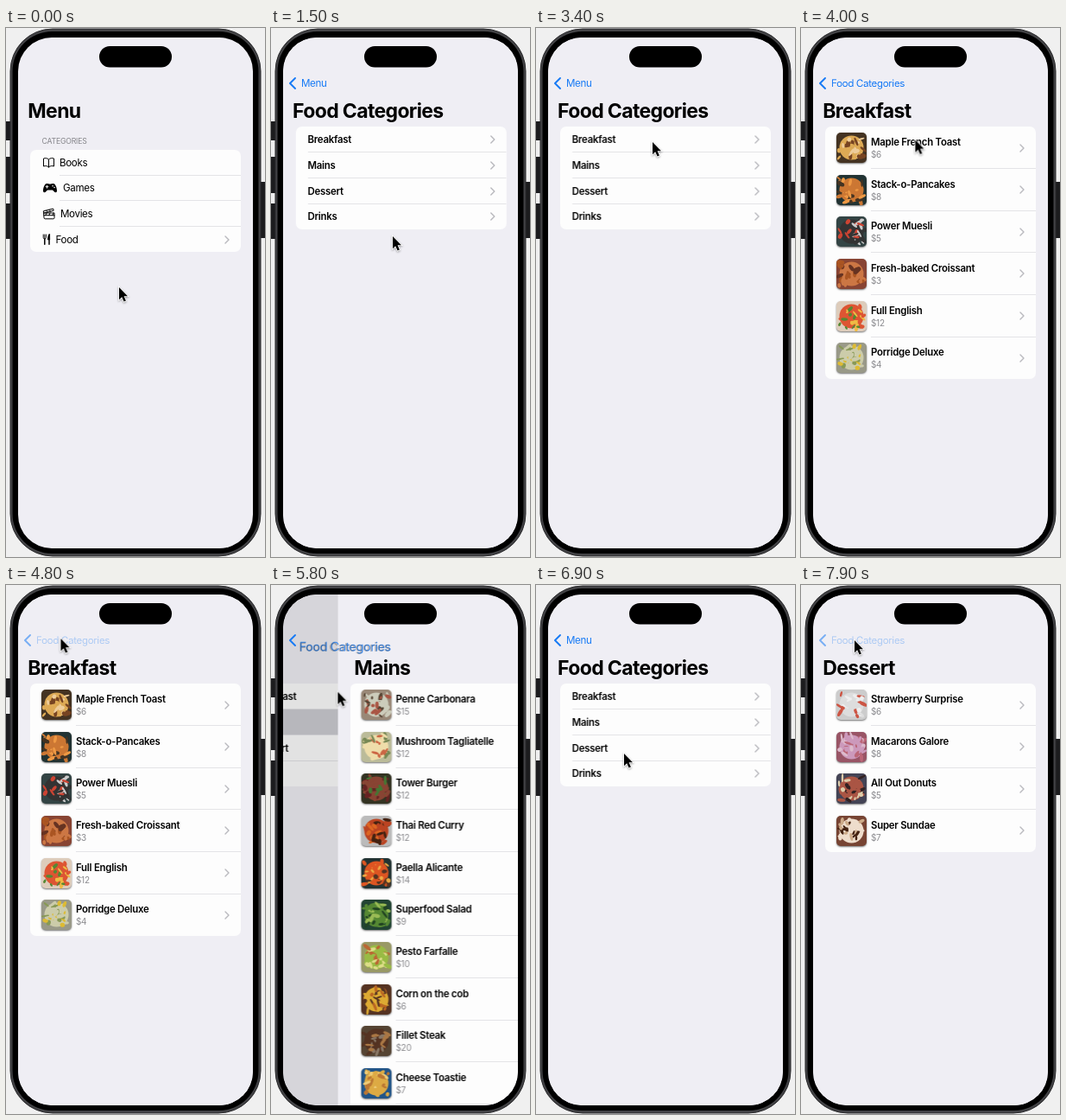
Animation of 300x612 px, one loop 8000 ms. Source, as an HTML page:

```html
<!DOCTYPE html>
<html lang="en">
<head>
<meta charset="utf-8">
<title>Food menu</title>
<style>
html, body { margin: 0; width: 100%; height: 100%; overflow: hidden; background: #f0f0f0; }
body { position: relative; font-family: Inter, Roboto, sans-serif; color: #000; }
svg, div, p { position: absolute; }
#phone, #cursor { left: 0; top: 0; overflow: visible; }
#screen { left: 14px; top: 0; width: 272px; height: 612px; overflow: hidden; clip-path: inset(11px 0 10px round 39px); }
.page { left: 0; top: 0; width: 272px; height: 612px; background: #efeef4; }
.layer { left: 0; top: 0; width: 272px; height: 612px; }
.dim { background: #000; opacity: 0; }
.card { background: #fdfdfd; border-radius: 7px; overflow: hidden; width: 244px; }
.line { height: 1px; right: 0; background: #e4e4e7; }
.hit { left: 0; width: 100%; background: #cdcdd2; opacity: 0; }
p { margin: -10px 0 0; line-height: 20px; white-space: pre; transform-origin: 0 50%; }
.title { font-size: 23px; font-weight: 700; letter-spacing: -.64px; }
.head { font-size: 8.7px; letter-spacing: -.2px; color: #85858a; }
.plain { font-size: 11.6px; letter-spacing: -.35px; }
.name { font-size: 11.4px; font-weight: 600; letter-spacing: -.24px; }
.price { font-size: 10px; letter-spacing: -.3px; color: #8a8a8e; }
.back { font-size: 11.6px; letter-spacing: -.35px; color: #177af5; }
.photo { width: 35px; height: 35px; border-radius: 5px; overflow: hidden; box-shadow: 0 1px 2px rgba(0,0,0,.55); }
.photo g { filter: blur(.4px); }
</style>
</head>
<body>
<svg id="phone" width="300" height="612">
  <path d="M0 108h6v22h-6zM0 149h6v42h-6zM0 203h6v41h-6zM294 178h6v65h-6z" fill="#1c1c1e"/>
  <rect x="5" y="1" width="290" height="610" rx="49" fill="#434346" stroke="#2a2a2c"/>
  <rect x="7.5" y="4" width="285" height="604" rx="46"/>
</svg>
<div id="screen"></div>
<svg id="cursor" width="12" height="19">
  <path d="M0 0V14.2L3.2 11.2L5.6 16.6L7.9 15.6L5.6 10.3H10Z" stroke="#fff" stroke-width="1.6"
    paint-order="stroke" style="filter:drop-shadow(0 1px 1px rgba(0,0,0,.35))"/>
</svg>
<script>
const LOOP = 8000, SLIDE = 500, EASE = 'cubic-bezier(.22,.5,.2,1)';
const $ = s => document.querySelector(s);
const at = (x, y) => `left:${x - 14}px;top:${y}px`;
const text = (cls, x, y, s, id = '') => `<p ${id && `id="${id}"`} class="${cls}" style="${at(x, y)}">${s}</p>`;
const chevron = (x, y, w, h, color, weight, id = '') =>
  `<svg ${id && `id="${id}"`} width="9" height="16" style="${at(x - 2, y - 8)}"><path d="M${w < 0 ? 2 - w : 2} ${8 - h}l${w} ${h}l${-w} ${h}"
    fill="none" stroke="${color}" stroke-width="${weight}" stroke-linecap="round" stroke-linejoin="round"/></svg>`;
const rowChevron = y => chevron(254, y, 4, 4, '#b9b9be', 1.4);

// White card split into equal rows by hairlines
function card(y, rows, height, inset, hits = false) {
  let inner = '';
  for (let i = 0; i < rows; i++) {
    if (hits) inner += `<div class="hit" style="top:${i * height}px;height:${height}px"></div>`;
    if (i) inner += `<div class="line" style="left:${inset - 28}px;top:${i * height - .5}px"></div>`;
  }
  return `<div class="card" style="${at(28.3, y)};height:${rows * height}px">${inner}</div>`;
}

let seed = 7;
const rnd = (lo, hi) => {
  seed = (seed * 16807) % 2147483647;
  return +(lo + (hi - lo) * seed / 2147483647).toFixed(1);
};

// A round serving with loose blobs in the tones of the dish
function photo(y, tones) {
  const [base, ...mix] = tones.split(' ').map(c => '#' + c);
  let blobs = `<circle cx="17.5" cy="17.5" r="14" fill="${mix[0]}"/>`;
  for (let i = 0; i < 26; i++) {
    const x = rnd(3, 32), cy = rnd(4, 31);
    blobs += `<ellipse cx="${x}" cy="${cy}" rx="${rnd(2, 5.5)}" ry="${rnd(1, 2.6)}" fill="${mix[i % 3]}"
      transform="rotate(${rnd(0, 180)} ${x} ${cy})"/>`;
  }
  return `<svg class="photo" viewBox="0 0 35 35" style="${at(41.4, y)};background:${base}"><g>${blobs}</g></svg>`;
}

const dishes = {
  Breakfast: `Maple French Toast|6|432 da5 742 ec9
Stack-o-Pancakes|8|233 c73 e94 432
Power Muesli|5|344 333 c43 ccc
Fresh-baked Croissant|3|843 c74 a52 632
Full English|12|dcb d53 eb4 583
Porridge Deluxe|4|998 cca db3 895`,
  Mains: `Penne Carbonara|15|987 ccb 543 a54
Mushroom Tagliatelle|12|bb9 eda 785 c64
Tower Burger|12|332 843 622 473
Thai Red Curry|12|bbb b42 d62 421
Paella Alicante|14|233 d52 ea4 532
Superfood Salad|9|243 583 242 9b5
Pesto Farfalle|10|996 9b4 dd8 b63
Corn on the cob|6|532 da3 b62 532
Fillet Steak|20|543 532 a74 876
Cheese Toastie|7|258 da4 b73 ec7`,
  Dessert: `Strawberry Surprise|6|ccc ddd c54 eee
Macarons Galore|8|956 c9b b67 dbc
All Out Donuts|5|445 a54 dca 322
Super Sundae|7|743 edc 421 ca8`
};

function dishPage(name) {
  const rows = dishes[name].split('\n'), h = 48.65;
  const full = rows.length > 9;
  return `<div class="page dish">` + text('title', 25.3, 95.5, name) + card(114, rows.length + full, h, 81) +
    rows.map((row, i) => {
      const [dish, price, tones] = row.split('|'), y = 114 + i * h;
      return photo(y + 7, tones) + text('name', 81, y + 18, dish) +
        text('price', 81, y + 32, '$' + price) + rowChevron(y + 24.5);
    }).join('') + '</div>';
}

const icons = `<svg width="272" height="612" viewBox="14 0 272 612" fill="none" stroke="#000" stroke-linecap="round" stroke-linejoin="round">
  <path d="M49.5 152C48 150.5 45.5 150.2 43.5 151V160C45.5 159.2 48 159.5 49.5 161C51 159.5 53.5 159.2 55.5 160V151C53.5 150.2 51 150.5 49.5 152V161"/>
  <path d="M47 180C49 179.6 49 180.6 51 180.6S53 179.6 55 180C57.5 180.5 58.8 185 59 188C59.1 190.6 57 191 55.5 189L54 187.6H48L46.5 189C45 191 42.9 190.6 43 188C43.2 185 44.5 180.5 47 180Z" fill="#000" stroke="none"/>
  <path d="M46 183.7h3M47.5 182.2v3" stroke="#fff" stroke-width=".9"/>
  <path d="M54 182.7h.1M56 184.6h.1" stroke="#fff" stroke-width="1.5"/>
  <path d="M44 214h12v5.6q0 1.2-1.2 1.2h-9.6q-1.2 0-1.2-1.2zM44 216.7h12M43.6 211.8l11-2.8.6 2.2-11 2.8zM46.6 211l1.6 2M50 210.2l1.6 2M47 214l-1.2 2.7M51 214l-1.2 2.7M55 214l-1.2 2.7"/>
  <path d="M43.2 239v3.4q0 1.6 1.6 1.6t1.6-1.6v-3.4M44.8 239v4" stroke-width=".9"/>
  <path d="M44.8 244v6.3M50 239v11.3" stroke-width="1.5"/>
  <path d="M50.3 238.6q-2 1.4-2 6.4h2z" fill="#000" stroke-width=".6"/>
</svg>`;

const menuPage = `<div class="page">` + text('title', 25.3, 95.5, 'Menu') + text('head', 41.5, 131, 'CATEGORIES') +
  card(140.6, 4, 29.65, 62) + icons +
  [['Books', 62], ['Games', 66], ['Movies', 63], ['Food', 57.5]]
    .map(([s, x], i) => text('plain', x, 155.6 + i * 29.65, s)).join('') + rowChevron(244.5) + '</div>';

const listPage = `<div class="page" id="list"><div class="layer" id="rows">` + card(114, 4, 29.75, 42, true) +
  ['Breakfast', 'Mains', 'Dessert', 'Drinks'].map((s, i) => {
    const y = 129 + i * 29.75;
    return text('name', 41.7, y, s) + rowChevron(y);
  }).join('') + `</div><div class="layer dim" id="dim"></div></div>`;

const navBar = chevron(21.5, 64, -6, 6, '#177af5', 1.9, 'arrow') + text('back', 35, 64, 'Menu', 'up') +
  `<div id="press" class="layer">${text('back', 35, 64, 'Food Categories', 'label')}</div>` +
  text('title', 25.3, 95.5, 'Food Categories', 'heading');

$('#screen').innerHTML = menuPage + `<div class="layer" id="food">` + listPage +
  Object.keys(dishes).map(dishPage).join('') + navBar + '</div>' +
  `<svg width="84" height="25" style="${at(108, 20.5)}"><rect width="84" height="24.5" rx="12.2"/></svg>`;

// Keyframes given as [ms, style, easing]
function play(el, steps) {
  const frames = steps.map(([ms, style, easing = 'linear']) => ({ ...style, offset: ms / LOOP, easing }));
  if (frames[0].offset > 0) frames.unshift({ ...steps[0][1], offset: 0 });
  if (frames.at(-1).offset < 1) frames.push({ ...steps.at(-1)[1], offset: 1 });
  el.animate(frames, { duration: LOOP, iterations: Infinity });
}

// Each visit opens a dish page and, if given, leaves it again
const visits = [[3500, 4880], [5630, 6300], [7050]];
function swing(el, trips, off, on, span = SLIDE) {
  play(el, trips.flatMap(([go, back]) => {
    const out = [[go, off, EASE], [go + span, on]];
    return back ? [...out, [back + SLIDE - span, on, EASE], [back + SLIDE, off]] : out;
  }));
}
const move = (x, y = 0, s = 1) => `translate(${x}px,${y}px) scale(${s})`;

play($('#food'), [[0, { opacity: 0 }, 'step-end'], [1500, { opacity: 1 }]]);
play($('#rows'), [[0, { transform: move(.8) }], [2250, { transform: move(.8) }], [2400, { transform: move(0) }]]);
swing($('#list'), visits, { transform: move(0) }, { transform: move(-82) });
swing($('#dim'), visits, { opacity: 0 }, { opacity: .14 });
swing($('#up'), visits, { opacity: 1, transform: move(0) }, { opacity: 0, transform: move(-40) }, 170);
swing($('#heading'), visits,
  { opacity: 1, transform: move(0) },
  { opacity: 0, transform: move(9.7, -31.5, .485) });
swing($('#label'), visits,
  { opacity: 0, transform: move(-9.7, 31.5, 2.06) },
  { opacity: 1, transform: move(0) });

document.querySelectorAll('.dish').forEach((page, i) => {
  swing(page, [visits[i]], { transform: move(272) }, { transform: move(0) });
  swing(page.querySelector('.title'), [visits[i]], { transform: move(32) }, { transform: move(0) });
});

document.querySelectorAll('.hit').forEach((row, i) => {
  if (!visits[i]) return;
  const [go, back] = visits[i], on = { opacity: 1 }, off = { opacity: 0 };
  const steps = [[go - 25, off], [go - 25, on]];
  play(row, back ? [...steps, [back + 250, on], [back + SLIDE, off]] : steps);
});

const press = low => [[4720, 4880], [6200, 6300], [7820]].flatMap(([down, up]) => {
  const on = { opacity: 1 }, dim = { opacity: low }, steps = [[down, on], [down + 40, dim]];
  return up ? [...steps, [up, dim], [up + 120, on]] : steps;
});
play($('#press'), press(.3));
play($('#arrow'), press(.55));

const path = [
  [0, 131, 300], [900, 141, 241], [1900, 141, 241], [2150, 144, 240], [2200, 144, 240],
  [2600, 134, 129], [2850, 134, 129], [3000, 135, 132], [3900, 135, 132], [4650, 63.5, 62],
  [5030, 63.5, 62], [5480, 82, 152], [5640, 82, 152], [5800, 77.5, 124], [6080, 63, 64],
  [6400, 63, 64], [6850, 102, 195], [7200, 102, 195], [7750, 62, 64]
];
play($('#cursor'), path.map(([ms, x, y]) =>
  [ms, { transform: move(x, y) }, ms === 5640 ? 'ease-in' : ms === 5800 ? 'ease-out' : 'ease-in-out']));
</script>
</body>
</html>
```
